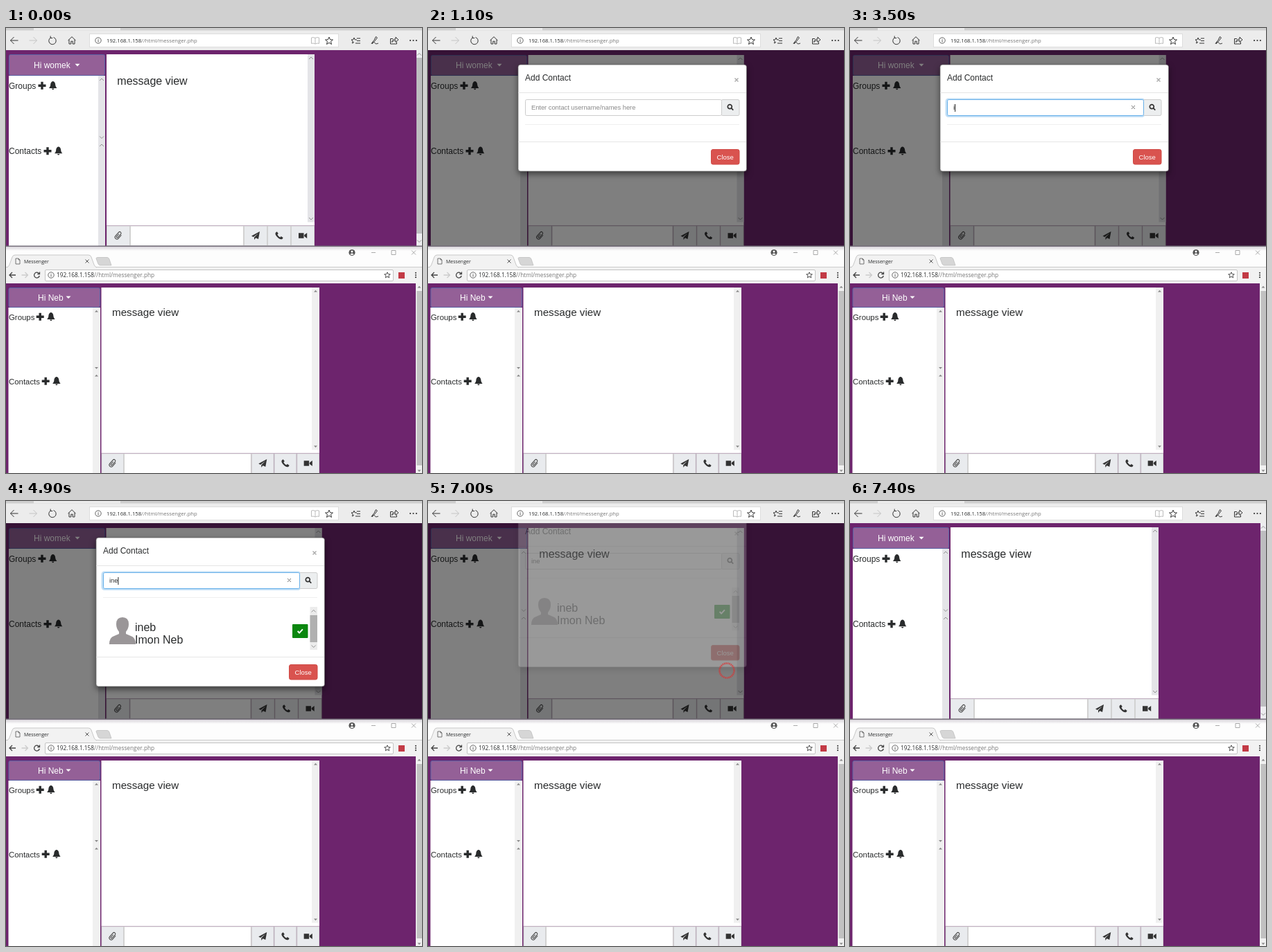
An HTML page for the animation above (8000 ms loop, 600 by 643 pixels).

```html
<!DOCTYPE html>
<html lang="en">
<head>
<meta charset="utf-8">
<title>Messenger</title>
<style>
html, body { margin: 0; width: 100%; height: 100%; overflow: hidden; background: #fff; }
svg { display: block; width: 100%; height: 100%; }
text { font-family: "Liberation Sans", Arial, sans-serif; fill: #292b2c; white-space: pre; }
.ui { font-family: "Open Sans", "Noto Sans", sans-serif; }
</style>
</head>
<body>
<svg id="stage" viewBox="0 0 600 643"></svg>
<script>
const PURPLE = '#6d246d', INK = '#292b2c', BAR = '#ececec';
const $ = id => document.getElementById(id);

const rect = (x, y, x2, y2, fill, more = '') =>
  `<rect x="${x}" y="${y}" width="${x2 - x}" height="${y2 - y}" fill="${fill}" ${more}/>`;
const text = (x, y, size, s, more = '') =>
  `<text x="${x}" y="${y}" font-size="${size}" ${more}>${s}</text>`;
const fill = (x, y, d, color = INK) =>
  `<path transform="translate(${x} ${y})" d="${d}" fill="${color}"/>`;
const line = (x, y, d, color = '#333', w = 1, turn = 0) =>
  `<path transform="translate(${x} ${y}) rotate(${turn})" d="${d}" fill="none" stroke="${color}" stroke-width="${w}"/>`;

const ICON = {
  plus: 'M-1.7-5.5h3.4v3.8h3.8v3.4h-3.8v3.8h-3.4v-3.8h-3.8v-3.4h3.8z',
  bell: 'M0-6.2C3-5.5 3.4-3 3.6-.5 3.8 1.5 5.2 2.5 5.6 3.6H-5.6C-5.2 2.5-3.8 1.5-3.6-.5-3.4-3-3-5.5 0-6.2zM-1.6 4.3h3.2a1.6 1.6 0 0 1-3.2 0z',
  plane: 'M6-6L4 5 .2 3.2-2 6V2.4L4-3.5-3.2 2-6 .6z',
  phone: 'M-5-4.5l1.8-1.3 2 2.9-1.4 1.4q1.3 2.7 4 4l1.4-1.4 2.9 2-1.3 1.9q-2 1-5.4-1.3-3-2.3-4.2-5-.8-2 .2-3.2z',
  video: 'M-6-3.8h7.5v7.6h-7.5zM2.2-1l4-3v8l-4-3z',
  drop: 'M-3.5-1.6h7L0 2z',
  clip: 'M2.8-3.5V3a2.8 2.8 0 0 1-5.6 0V-4a2 2 0 0 1 4 0V2.5a1.1 1.1 0 0 1-2.2 0V-2.5',
  back: 'M5.5 0h-11M-.5-5l-5 5 5 5',
  next: 'M-5.5 0h11M.5-5l5 5-5 5',
  reload: 'M1.5-5A5.2 5.2 0 1 1-2.5-4.6M-2.8-7v3h3',
  home: 'M-5.5 0L0-5.3 5.5 0M-4-1.2V5h2.8V1.2h2.4V5H4v-6.2',
  star: 'M0-5.4L1.6-1.7 5.5-1.5 2.5 1 3.5 5 0 2.8-3.5 5-2.5 1-5.5-1.5-1.6-1.7z',
  cross: 'M-2.5-2.5l5 5M2.5-2.5l-5 5'
};

const info = (x, y) => `<circle cx="${x}" cy="${y}" r="4.2" fill="none" stroke="#555" stroke-width=".9"/>` +
  line(x, y, 'M0-2.3v1M0-.6v3', '#555');
const dots = (x, y, dx, dy, color) => [-1, 0, 1].map(i =>
  `<circle cx="${x + i * dx}" cy="${y + i * dy}" r="1.1" fill="${color}"/>`).join('');
const url = (x, y, size) => text(x, y, size,
  '192.168.1.158<tspan fill="#777">//html/messenger.php</tspan>', 'class="ui"');

// Arrow heads of a scroll bar: thin for the upper window, solid for the lower
const arrow = (x, y, up, solid) => {
  const s = up ? -1 : 1;
  return solid ? fill(x, y, `M-2.5 ${-s}h5L0 ${s * 1.8}z`, '#888')
    : line(x, y, `M-3 ${-s * 1.5}L0 ${s * 1.5} 3 ${-s * 1.5}`, '#888', .9);
};

function app(p) {
  const { edge, side, top, head, mid, left, right, bar, end, solid, size, btn } = p;
  const track = solid ? '#f0f0f0' : '#e4e4e8', w = solid ? 11 : 10;
  const section = (name, x, y) => text(4, y, size, name) +
    fill(x, y - 4.7, ICON.plus) + fill(x + 15.7, y - 4.7, ICON.bell);
  let s = rect(edge, head, side, end, '#fff') + rect(side - w, head, side, end, track) +
    rect(edge + .5, top + .5, side - .5, head - .5, '#946097', 'stroke="#5a62a4" rx="2"') +
    text(p.nameX, p.nameY, 12, p.name, 'style="fill:#fff"') +
    fill(p.dropX, p.nameY - 4.6, ICON.drop, '#fff') +
    section('Groups', p.plusX, p.groupsY) + section('Contacts', p.plusX + 8, p.contactsY) +
    arrow(side - w / 2, head + 5.5, 1, solid) + arrow(side - w / 2, mid - 6, 0, solid) +
    arrow(side - w / 2, mid + 5.5, 1, solid) +
    rect(left, top, right, bar, '#fff') + rect(right - w, top, right, bar - 5, track) +
    arrow(right - w / 2, top + 5.5, 1, solid) + arrow(right - w / 2, bar - 10, 0, solid) +
    text(p.viewX, p.viewY, p.viewSize, 'message view');
  const cell = (x, x2, color) => rect(x + .5, bar + .5, x2 - .5, end - .5, color, 'stroke="#d2d2d2"');
  const cy = bar + 14.5, start = right - 3 * btn;
  s += cell(left, left + p.attach, '#e9ebee') + cell(left + p.attach, start, '#fff') +
    line(left + p.attach / 2, cy, ICON.clip, '#444', 1, 42);
  ['plane', 'phone', 'video'].forEach((n, i) => {
    s += cell(start + i * btn, start + (i + 1) * btn, '#e9ebee') +
      fill(start + (i + .5) * btn, cy, ICON[n], '#333');
  });
  return s;
}

const upper = (left, top, right) => app({
  edge: 4, side: 143, top, head: 69, mid: 164, left, right, bar: 285.5, end: 315, size: 12,
  btn: 34, attach: 34, name: 'Hi womek', nameX: 40, nameY: 58, dropX: 103, plusX: 52,
  groupsY: 88, contactsY: 182.4, viewX: 160.3, viewY: 82, viewSize: 16
});

const upperBar = () => rect(0, 0, 600, 32, BAR) + rect(0, 0, 600, 3.5, '#cfcfcf') +
  rect(40, 0, 165, 3.5, BAR) + rect(120.5, 8.5, 479.5, 27.5, '#fff', 'stroke="#ddd"') +
  line(12, 18, ICON.back) + line(39, 18, ICON.next, '#c4c4c4') + line(67, 18.5, ICON.reload) +
  line(95, 18, ICON.home) + info(133, 18) + url(145, 21, 7.7) +
  line(446, 18, 'M0-3.6Q-3-5-5.5-4V4.4Q-3 3.4 0 5 3 3.4 5.5 4.4V-4Q3-5 0-3.6V5', '#bbb') +
  line(466, 18.5, ICON.star) + line(503, 18, 'M-1-4L.2-1.2 3-1M-1-4L-2.2-1.2-5-1-2.8 1-3.5 4-1 2.4M3-3h5M3 .5h5M1 4h7') +
  line(532, 18, 'M-5 4.5Q0-1 1.5-5.5L3.5-4Q-1 3-4.5 4.5M-4 5Q-1 1 0 3.5T5 4') +
  line(560, 18, 'M-2-2.5h-3.5V5h9V2.5M-3.5 2.5Q-3-2 2-2V-5L6-1 2 2.5V0Q-1-.5-3.5 2.5') +
  dots(587.5, 18, 4.4, 0, '#333');

const lower = () => rect(0, 315, 600, 643, '#fdfdfd') + rect(0, 314.5, 600, 316, '#77707c') +
  rect(0, 316, 600, 322, 'url(#edge)') + rect(0, 346, 600, 369, '#f2f2f2') + line(0, 345.5, 'M0 0H600', '#ccc') +
  `<path d="M1 346Q4 345 5 342L9 331Q10 328 13 328H119Q122 328 123 331L127 342Q128 345 131 346" fill="#f2f2f2" stroke="#bbb" stroke-width=".8"/>` +
  `<path d="M130 333Q130 331.5 132 331.5H146Q148 331.5 149 334L152 343H136Q134 343 133 341z" fill="#d6d6d6" stroke="#bbb" stroke-width=".7"/>` +
  line(17, 337, 'M-3-4h4l2 2v6h-6zM1-4v2h2', '#555', .8) + text(26, 339.6, 7, 'Messenger', 'class="ui"') +
  line(117, 337, ICON.cross, '#555') +
  `<circle cx="499" cy="324.5" r="4.6" fill="#555"/><circle cx="499" cy="323" r="1.5" fill="#fff"/>` +
  fill(499, 327, 'M-2.8 0Q0-3 2.8 0Q0 2 -2.8 0z', '#fff') +
  line(530, 324.5, 'M-3 0h6', '#aaa') + line(559, 324.5, 'M-3-3h6v6h-6z', '#aaa') + line(588, 324.5, 'M-3-3l6 6M3-3l-6 6', '#aaa') +
  rect(56.5, 349.5, 558.5, 365.5, '#fff', 'stroke="#c4c4c4" rx="1.5"') +
  line(9.5, 357, 'M4.5 0h-9M-.5-4l-4 4 4 4', '#444', 1.3) + line(27, 357, 'M-4.5 0h9M.5-4l4 4-4 4', '#ccc', 1.3) +
  line(44.5, 357, 'M3.4-1.8A3.9 3.9 0 1 0 3.8 1M4-4.6v3.2H.8', '#444', 1.3) + info(65, 357) + url(73, 360.2, 8.3) +
  `<g transform="translate(550 357) scale(.78)">${line(0, 0, ICON.star, '#444', 1.2)}</g>` +
  rect(566, 353, 575, 362, '#c23a45') + dots(591, 357, 0, 3.2, '#444') +
  rect(0, 369, 600, 643, PURPLE) + rect(591, 369, 600, 643, '#f1f1f1') + rect(592.5, 380, 600, 632, '#c1c1c1') +
  arrow(596, 374.5, 1, 1) + arrow(596, 639.5, 0, 1) +
  app({
    edge: 3.5, side: 136, top: 375, head: 404, mid: 497, left: 137.5, right: 452, bar: 614.5, end: 644,
    size: 11.4, btn: 32.7, attach: 32.5, name: 'Hi Neb', nameX: 46, nameY: 393.6, dropX: 90, plusX: 49.2,
    solid: true, groupsY: 422, contactsY: 515, viewX: 153, viewY: 416, viewSize: 15.2
  });

const modal = () =>
  rect(130, 53, 459.5, 207, '#fff', 'id="card" rx="3.5" stroke="#666" stroke-width=".7" style="filter:drop-shadow(0 4px 4px rgba(0,0,0,.5))"') +
  text(140, 76, 12, 'Add Contact') + line(445, 75, ICON.cross, '#aaa', 1.4) + line(130, 93.5, 'M0 0H329', '#e5e5e5') +
  rect(139, 103, 424, 127.5, 'none', 'id="glow" rx="3" stroke="#66afe9" stroke-opacity=".4" stroke-width="3"') +
  rect(423, 103.5, 449, 126.5, '#eceeef', 'stroke="#ccc" rx="2"') +
  rect(140.5, 103.5, 423.5, 126.5, '#fff', 'id="field" rx="2"') +
  line(435.3, 113.7, 'M3 0A3 3 0 1 1-3 0 3 3 0 1 1 3 0M2.2 2.2L5 5', '#333', 1.7) +
  text(149, 118, 9.3, '', 'id="query"') + rect(0, 110, 1, 121, '#222', 'id="caret"') +
  `<g id="clear">${line(408.5, 114.5, ICON.cross, '#777')}</g>` +
  line(140, 139.5, 'M0 0H309', '#efefef') +
  `<g id="found">${fill(168, 187, 'M-19 20Q-19 10-12 8L-5 5V2Q-9-3-9-9-9-19 0-19T9-9Q9-3 5 2V5L12 8Q19 10 19 20z', '#9a9698')}` +
  text(186, 187.5, 16, 'ineb') + text(186, 205.5, 16, 'Imon Neb') +
  rect(413, 178, 435.5, 198, '#0b870f', 'id="tick" rx="1"') + line(424.3, 188, 'M-3.6 0l2.4 2.6L3.6-2.6', '#fff', 2) +
  rect(438.5, 153, 449, 215, '#ececec') + rect(438.5, 165, 449, 204, '#b0b0b0') + arrow(443.7, 159, 1) + arrow(443.7, 210, 0) + '</g>' +
  `<g id="foot">${line(130, 164.5, 'M0 0H329', '#e5e5e5')}${rect(408.5, 175.5, 449, 197, '#d9534f', 'id="close" rx="2.5" stroke="#d04a46"')}` +
  text(428.7, 189.7, 9.5, 'Close', 'text-anchor="middle" style="fill:#fff"') + '</g>';

$('stage').innerHTML =
  `<defs><clipPath id="page"><path d="M0 32H600V315H0z"/></clipPath>
  <linearGradient id="edge" x2="0" y2="1"><stop stop-color="#d8d4da"/><stop offset="1" stop-color="#fdfdfd"/></linearGradient></defs>` +
  rect(0, 32, 600, 315, PURPLE) +
  `<g id="calm">${upper(145, 38, 445)}${rect(592, 32, 600, 315, '#ededf0')}${rect(592, 43, 600, 297, '#bdbdc0')}${arrow(596, 38, 1)}${arrow(596, 308, 0)}</g>` +
  `<g id="wide">${upper(144.5, 39, 455.5)}</g>` + rect(0, 32, 600, 315, '#000', 'id="shade"') +
  `<g clip-path="url(#page)"><g id="modal">${modal()}</g></g>` + upperBar() + lower() +
  '<circle id="ring" fill="none" stroke="#e32b2b" stroke-width="2.6" stroke-dasharray="1.6 .9"/>';

const OPEN = 610, CLOSE = 6880, FOCUS = 1400, BLUR = 5700, LEAVE = 6800;
const CLICKS = [[500, 62, 177], [FOCUS, 280, 114.5], [BLUR, 419, 188], [LEAVE, 431, 245]];
const ramp = (t, a, d) => Math.min(1, Math.max(0, (t - a) / d));
const show = (id, on) => $(id).style.display = on ? '' : 'none';

function caretAlpha(t) {
  if (t < FOCUS || t >= 5200) return 0;
  if (t < 3500) return 1 - ramp(t, 2300, 300) + ramp(t, 2800, 300);
  return 1 - ramp(t, 4200, 200) + (t >= 4900);
}

function draw(t) {
  const wide = t >= OPEN && t < CLOSE + 450;
  show('calm', !wide);
  show('wide', wide);
  $('shade').setAttribute('opacity', .5 * (ramp(t, OPEN, 150) - ramp(t, CLOSE + 300, 150)));

  const moved = ramp(t, OPEN + 150, 300) - ramp(t, CLOSE, 300);
  $('modal').setAttribute('transform', `translate(0 ${-70 * (1 - moved)})`);
  $('modal').style.opacity = ramp(t, OPEN + 150, 150) - ramp(t, CLOSE, 150);

  const grow = t < 3600 ? 0 : t < 3700 ? 86 : 61;
  $('card').setAttribute('height', 154 + grow);
  $('foot').setAttribute('transform', `translate(0 ${grow})`);
  show('found', grow);

  const focus = t >= FOCUS && t < BLUR;
  show('glow', focus);
  $('field').setAttribute('stroke', focus ? '#66afe9' : '#ccc');
  show('clear', focus && t >= 3500);
  const typed = 'ine'.slice(0, (t >= 3500) + (t >= 3700) + (t >= 3900));
  const query = $('query');
  query.textContent = typed || 'Enter contact username/names here';
  query.style.fill = typed ? '#333' : '#888';
  $('caret').setAttribute('x', 149 + (typed ? query.getComputedTextLength() : 0));
  $('caret').setAttribute('opacity', caretAlpha(t));
  $('tick').setAttribute('stroke', t >= BLUR && t < LEAVE ? '#5aa2d8' : 'none');
  $('close').setAttribute('fill', t < LEAVE ? '#d9534f' : '#c9302c');

  const click = CLICKS.find(c => t >= c[0] && t < c[0] + 600);
  show('ring', click);
  if (click) {
    const age = (t - click[0]) / 1000, ring = $('ring');
    ring.setAttribute('cx', click[1]);
    ring.setAttribute('cy', click[2]);
    ring.setAttribute('r', 8.5 + 10 * age);
    ring.setAttribute('opacity', 1 - age / .7);
  }
}

const begin = performance.now();
function tick(now) {
  draw(Math.floor(Math.max(0, now - begin) % 8000 / 100) * 100);
  requestAnimationFrame(tick);
}
draw(0);
requestAnimationFrame(tick);
</script>
</body>
</html>
```
